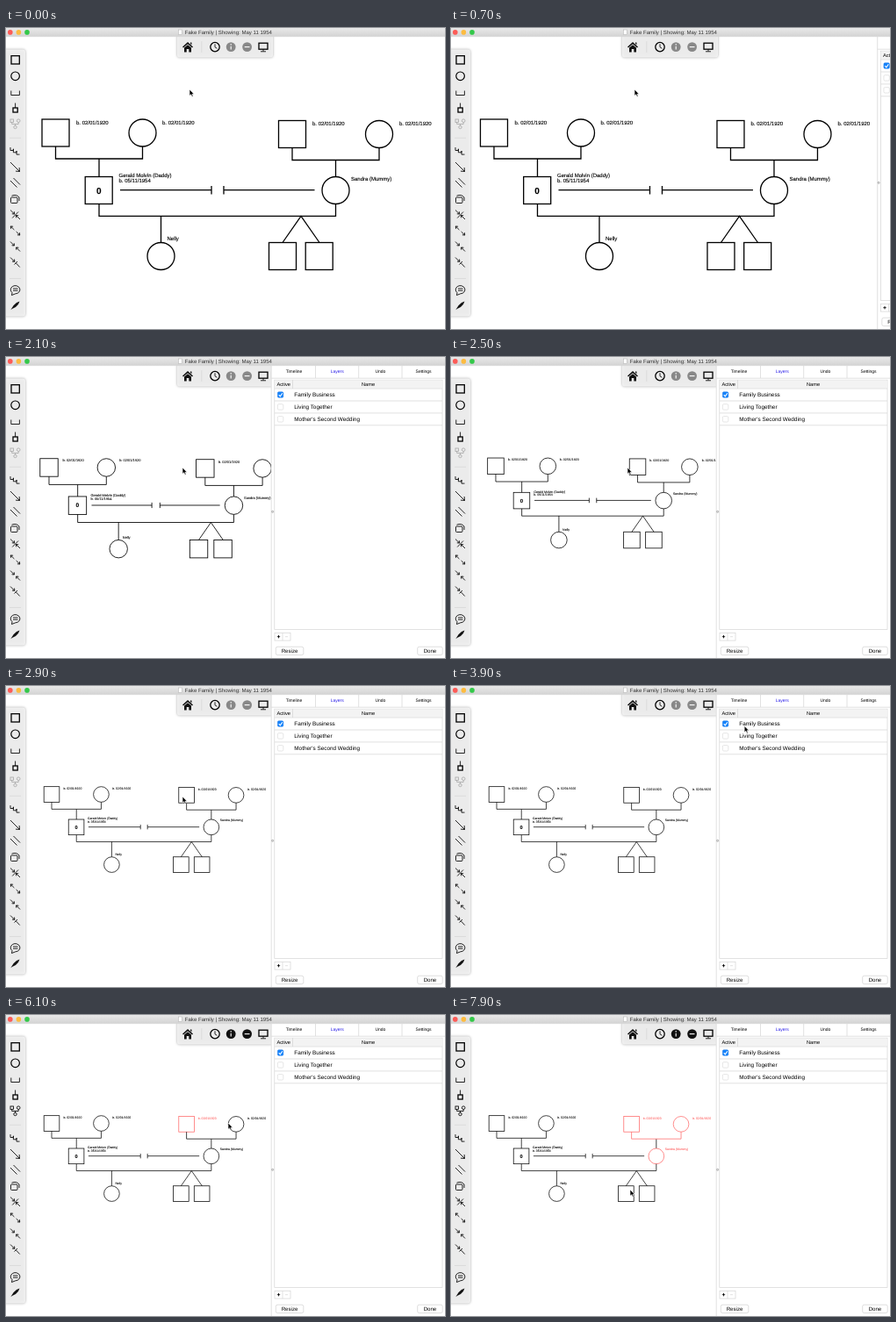
Recreate the animation shown at these times as an HTML page. Size 500 px wide and 343 px high, loop 8 s.

```html
<!DOCTYPE html>
<html lang="en">
<head>
<meta charset="utf-8">
<title>Family diagram</title>
<style>
html, body { margin: 0; width: 100%; height: 100%; overflow: hidden; background: #fff; }
svg { display: block; width: 100vw; height: 100vh; text-rendering: geometricPrecision;
  font-family: "Liberation Sans", Arial, sans-serif; }
#tree, .icons { fill: none; stroke: #000; }
#tree { stroke-width: 1.3; }
.icons { stroke-width: .85; }
text { fill: #000; stroke: none; }
#tree text { font-size: 6px; stroke: #000; stroke-width: .12; }
#tree .red { stroke: #f66; }
#tree .red text { fill: #f66; stroke: #f66; }
.mid { text-anchor: middle; }
.bar { fill: #f7f7f7; fill-opacity: .85; filter: drop-shadow(0 .5px 1.8px #0006); }
.line { stroke: #d4d4d4; stroke-width: .7; fill: none; }
.solid { fill: #111; stroke: none; }
.white { fill: none; stroke: #fff; stroke-width: 1.1; }
</style>
</head>
<body>
<svg id="stage" viewBox="0 0 500 343" preserveAspectRatio="none"></svg>
<script>
const LOOP = 8000;
const path = (d, c = '') => `<path class="${c}" d="${d}"/>`;
const rect = (x, y, w, h, more = '') => `<rect x="${x}" y="${y}" width="${w}" height="${h}" ${more}/>`;
const disc = (x, y, r, more = '') => `<circle cx="${x}" cy="${y}" r="${r}" ${more}/>`;
const text = (x, y, s, size = 6, more = '') => `<text x="${x}" y="${y}" font-size="${size}" ${more}>${s}</text>`;
const label = (x, y, s, size, more = '') => text(x, y, s, size, 'class="mid" ' + more);
const group = (id, body, more = '') => `<g id="${id}" ${more}>${body}</g>`;

// People in the diagram, all 31 units wide
const man = (x, y) => rect(x - 15.5, y - 15.5, 31, 31);
const woman = (x, y) => disc(x, y, 15.5);
const couple = (x1, x2, y, drop) => path(`M${x1} ${y}v${drop}H${x2}v${-drop}`);
const born = (x, y) => text(x, y, 'b. 02/01/1920');

// Line with an open arrow head at its end
function arrow(x1, y1, x2, y2, head = 2.8) {
  const a = Math.atan2(y2 - y1, x2 - x1);
  const tip = s => `${x2 - head * Math.cos(a + s)} ${y2 - head * Math.sin(a + s)}`;
  return path(`M${x1} ${y1}L${x2} ${y2}M${tip(.7)}L${x2} ${y2}L${tip(-.7)}`);
}

const tree = group('tree',
  man(56.5, 119.5) + woman(155.5, 119.5) + couple(56.5, 155.5, 135, 14) +
  born(80, 109.7) + born(178, 109.7) +
  path('M106 149V169.5M375.5 150.5V169.5M176.5 214V244.5') +
  group('grandpa', man(326, 121) + born(349, 111.3)) +
  group('grandma', woman(425, 121) + born(448, 111.3)) +
  group('bond', couple(326, 425, 136.5, 14)) +
  man(105.7, 185) + label(105.7, 188.5, '<tspan style="font-size:10px;font-weight:bold">0</tspan>') +
  text(128.5, 170, 'Gerald Molvin (Daddy)') + text(128.5, 176, 'b. 05/11/1954') +
  group('mother', woman(375.5, 185) + text(393, 173.6, 'Sandra (Mummy)')) +
  path('M130 184.7H234M234 180v9.4M248 180v9.4M248 184.7H351.5') +
  couple(106, 375.5, 200.5, 13.8) +
  woman(176.5, 260) + text(183.5, 242, 'Nelly') +
  path('M315 244.5L336 214.3L357 244.5') + man(315, 260) + man(356.7, 260));

const side = rect(-4, 24.5, 26, 304, 'rx="3" class="bar"') + group('tools',
  rect(6, 31.7, 9.3, 9.3, 'stroke-width="1.3"') + disc(10.6, 54.8, 4.8, 'stroke-width="1.2"') +
  path('M5.8 71.5v5h9.6v-5') +
  path('M10.6 85.5v5.5') + rect(8, 91, 5.2, 5, 'stroke-width="1.3"') +
  group('kin', rect(5, 104, 3.4, 3.4) + disc(14.2, 105.7, 1.8) + path('M6.7 107.5v2h7.5v-2M10.5 109.5v2') + disc(10.5, 113, 1.7)) +
  path('M4 125.3H17M4 285.5H17', 'line') +
  path('M5 136v3.5h3.4v-1.7v4h3.6v-1.7v4h3.5') +
  arrow(5, 153, 15.5, 163.5, 4.5) +
  path('M5 174L12.5 181.5M8.5 171L16 178.5') +
  rect(5.5, 193, 7.5, 6.5, 'rx="1"') + path('M6.5 191.2Q12 189 15 193V197') +
  arrow(5, 207.5, 9.6, 212) + arrow(16, 218, 11.4, 213.5) + path('M7.2 216.5L14 209.5') +
  arrow(9.4, 230, 5.3, 226) + arrow(11.6, 232, 15.7, 236) +
  arrow(5, 243.5, 9.4, 248) + arrow(16, 254.5, 11.6, 250) +
  arrow(5, 261.5, 9.8, 266.3) + path('M9.5 269.5L13 266M11.3 267.8L15.7 272.5') +
  path('M7 301.6A5.3 4.6 0 1 1 10.8 302.8L6.5 304.5ZM8 297h5.5M8 299.2h5.5') +
  path('M5.3 321.3L8.5 316.3Q12 312.3 15.5 311.5Q14.5 315.5 11 318L7 320Z', 'solid'),
  'class="icons"');

const menu = path('M195 8H304V31Q304 33.5 301 33.5H198Q195 33.5 195 31Z', 'bar') +
  group('menu',
    path('M201 21.5L207 16L213 21.5L212 22.6L207 18.2L202 22.6ZM203 22.6L207 19.2L211 22.6V27.5H208.3V24H205.7V27.5H203ZM210 16.5h1.4v2.8l-1.4-1.2Z', 'solid') +
    path('M222.8 15.2V28', 'line') +
    disc(238, 21.6, 5.2, 'stroke-width="1.3"') + path('M238 18.3V21.8L240.4 23.3') +
    disc(256.2, 21.6, 5.4, 'class="need"') + path('M256.2 20.8v3.8M256.2 18v1.4', 'white') +
    disc(274.6, 21.6, 5.4, 'class="need"') + path('M271.7 21.6h5.8', 'white') +
    rect(288, 17.2, 10, 7, 'stroke-width="1.3"') + path('M293 24.2v2.3M290 26.8h6'),
    'class="icons"');

const rows = ['Family Business', 'Living Together', "Mother's Second Wedding"].map((name, i) => {
  const y = 43 + 13.9 * i;
  return text(328.3, y + 2.1, name, 6.4) + path(`M306 ${y + 7}H497`, 'line') +
    rect(309.4, y - 3.2, 6.4, 6.4, `rx="1.3" stroke-width=".5" ${i ? 'fill="#fff" stroke="#ccc"' : 'fill="#1583fb" stroke="#1575e6"'}`);
}).join('');
const button = (x, w, s) => rect(x, 330.2, w, 9.4, 'rx="2" fill="#fff" stroke="#c8c8c8" stroke-width=".6"') +
  label(x + w / 2, 337, s, 6.1);

const panel = group('panel',
  rect(302, 9, 200, 336, 'fill="#fff"') + path('M302.2 10V343', 'line') +
  ['Timeline', 'Layers', 'Undo', 'Settings'].map((s, i) =>
    label(328 + 49.2 * i, 18.4, s, 5, i == 1 ? 'style="fill:#2418e8"' : '')).join('') +
  path('M352.5 10V24M401.7 10V24M451 10V24M302 24.2H500', 'line') +
  rect(305.8, 26.2, 191.2, 284.3, 'class="line"') + rect(306.2, 26.6, 190.4, 9, 'fill="#f3f3f3"') +
  path('M306 36H497M326.5 26V36', 'line') +
  label(316.2, 33, 'Active', 5.7) + label(412.5, 33, 'Name', 5.7) + rows +
  path('M310.8 43.2l1.5 1.6l2.5-3.6', 'white') +
  rect(306, 314.3, 18, 8.8, 'class="line"') + path('M315 314.3v8.8', 'line') +
  path('M308.8 318.7h3.4M310.5 317v3.4', 'icons') + path('M318 318.7h3', 'line') +
  button(307.3, 31.5, 'Resize') + button(468.7, 28.5, 'Done') +
  disc(303.6, 176.3, 1.1, 'fill="#ddd" stroke="#888" stroke-width=".5"'));

const titleBar = rect(0, 0, 500, 9.7, 'fill="url(#chrome)"') + path('M0 9.7H500', 'line') +
  ['#fc5b57', '#fdbc40', '#34c84a'].map((c, i) => disc(4.8 + 9.6 * i, 4.9, 2.8, `fill="${c}"`)).join('') +
  rect(196.3, 2, 4, 5.6, 'fill="#fff" stroke="#aaa" stroke-width=".5"') +
  text(203.8, 7, 'Fake Family | Showing: May 11 1954', 6.07, 'style="fill:#333"');

const $ = id => document.getElementById(id);
$('stage').innerHTML =
  '<defs><linearGradient id="chrome" x2="0" y2="1"><stop stop-color="#e9e9e9"/><stop offset="1" stop-color="#d3d3d3"/></linearGradient></defs>' +
  tree + side + menu + panel + titleBar +
  '<path id="cursor" d="M0 0V7.2L1.7 5.7L2.9 8.3L4.1 7.8L3 5.2H5.2Z" stroke="#fff" stroke-width=".6"/>';

const smooth = k => k * k * (3 - 2 * k);
// keys: [time, ...values], blended between neighbours
function track(keys, t, ease = k => k) {
  const n = keys.findIndex(k => k[0] > t);
  if (n < 0) return keys[keys.length - 1].slice(1);
  if (!n) return keys[0].slice(1);
  const a = keys[n - 1], b = keys[n], k = ease((t - a[0]) / (b[0] - a[0]));
  return a.slice(1).map((v, i) => v + (b[i + 1] - v) * k);
}

const pointer = [
  [700, 209, 70], [1300, 201, 126], [3200, 201, 126], [4000, 340, 42], [4350, 340, 42],
  [4700, 227, 95], [4800, 227, 95], [4900, 219.5, 96.5], [5300, 204.5, 123], [5700, 204.5, 123],
  [6100, 253, 123], [6350, 260, 122], [6650, 260, 122], [7000, 238, 139], [7300, 232, 160],
  [7500, 232, 160], [7900, 204, 199]];
// scale, x, y
const view = [
  [600, 1, 0, 0], [1200, 1, -99.8, 0], [1600, 1, -99.8, 0],
  [2100, .66, 11.7, 47.1], [2300, .607, 16.4, 52], [2400, .607, 16.4, 52], [2900, .57, 19.8, 55.4]];
const picks = { grandpa: 5400, grandma: 6300, bond: 7000, mother: 7500 };

function draw(now) {
  const t = now % LOOP;
  const [s, x, y] = track(view, t, t < 1200 ? smooth : undefined);
  $('tree').setAttribute('transform', `translate(${x} ${y}) scale(${s})`);
  const [slide] = track([[600, 198.5], [1200, 0]], t, smooth);
  $('panel').setAttribute('transform', `translate(${slide} 0)`);
  $('cursor').setAttribute('transform', `translate(${track(pointer, t, smooth)})`);
  for (const id in picks) $(id).setAttribute('class', t >= picks[id] ? 'red' : '');
  const on = t >= picks.grandpa;
  $('kin').style.stroke = on ? '#000' : '#aaa';
  for (const e of document.querySelectorAll('.need')) {
    e.style.fill = on ? '#111' : '#888';
    e.style.stroke = 'none';
  }
  requestAnimationFrame(draw);
}
requestAnimationFrame(draw);
</script>
</body>
</html>
```
